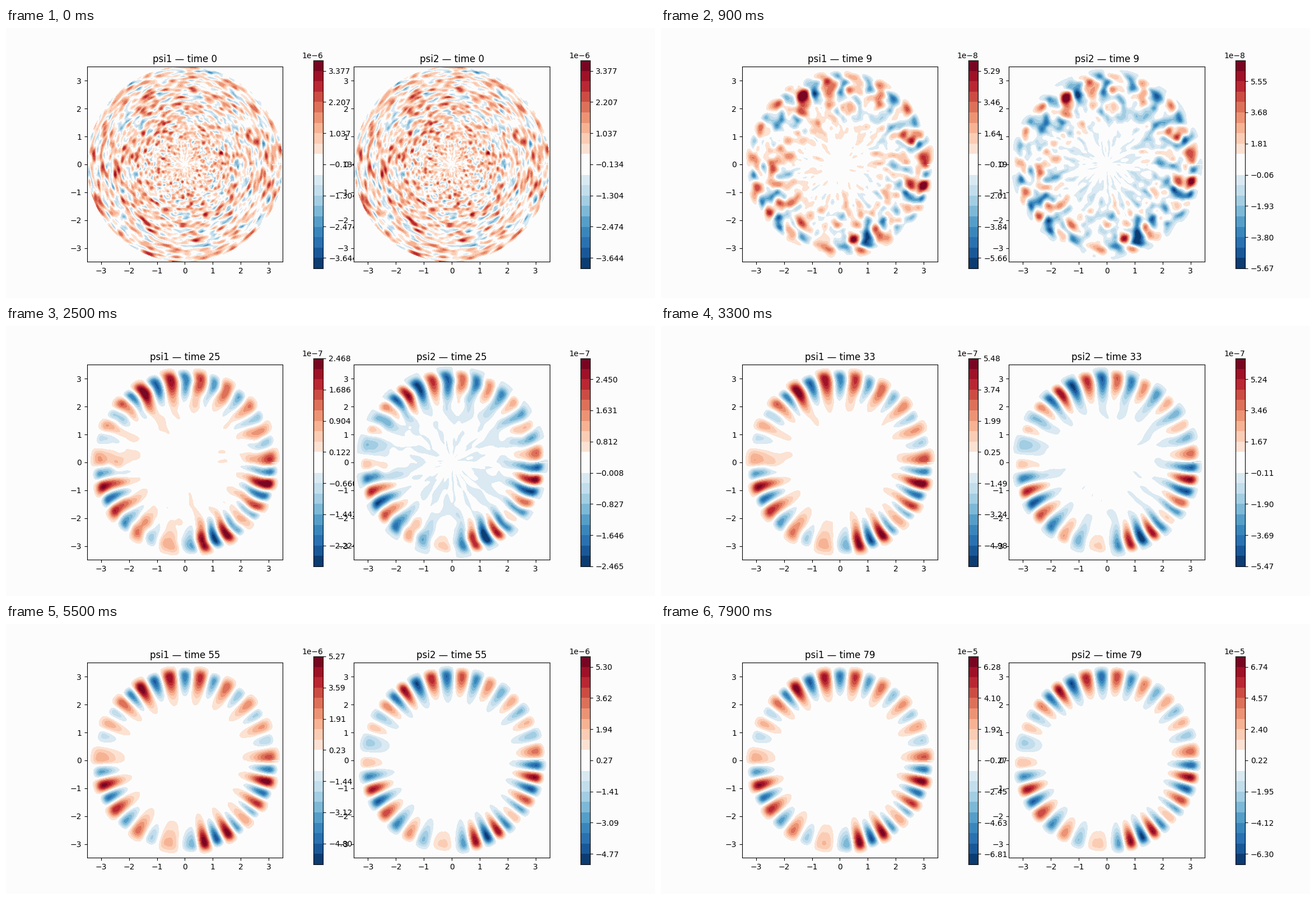
A matplotlib script for the animation above (8000 ms loop, 1159x483 px).

```python
import numpy as np
import matplotlib.pyplot as plt
from matplotlib.animation import FuncAnimation
from matplotlib.ticker import FixedLocator

W, H, DPI = 1159, 483, 100
FRAMES, INTERVAL = 80, 100
PAPER = "#fcfcfc"
BANDS = 20
LOBES = 38
TAU = 2 * np.pi

# Key lobes of the ring wave: number, angle in degrees, strength.
# Even lobes are crests, odd ones troughs; the rest follow in between.
RING = np.array([
    (0, 2.5, .59), (1, 14.5, .34), (5, 50.6, .45), (8, 79.4, .71),
    (12, 121.4, .97), (15, 146, .32), (17, 162.8, .30), (18, 178, .31),
    (20, 197, .90), (22, 215.5, .73), (26, 257.8, .26), (27, 274.4, .52),
    (28, 283.3, .97), (30, 300.7, .95), (32, 315.7, .31), (34, 328.9, .70),
    (36, 345.6, .97)])

# Colour scale while the wave grows: time, then half range and
# centre (as a share of the half range) for each panel.
GROWTH = np.array([
    (9, 6.083e-8, -.0307, 6.2333e-8, .0904),
    (25, 2.60667e-7, -.0532, 2.73056e-7, .09722),
    (41, 1.29556e-6, -.06048, 1.2972e-6, .06437),
    (55, 5.594e-6, -.05828, 5.594e-6, .04755),
    (66, 1.7983e-5, -.05021, 1.7926e-5, .03962),
    (79, 7.273e-5, -.03657, 7.245e-5, .03078)])
START = 3.9007e-6, -.03425

NR, NT = 110, 400
r = np.linspace(.02, 3.5, NR)[:, None]
theta = np.linspace(0, TAU - .007, NT)[None, :]
X, Y = r * np.cos(theta), r * np.sin(theta)

rng = np.random.default_rng(4)
SPECTRUM = np.fft.fft2(rng.standard_normal((NR, NT)))
KR = TAU * np.fft.fftfreq(NR, 3.5 / NR)[:, None]
KT = np.fft.fftfreq(NT, 1 / NT)[None, :]

cmap = plt.get_cmap("RdBu_r")
COLORS = [cmap((i + .5) / BANDS) for i in range(BANDS)]
COLORS[9] = COLORS[10] = PAPER


def rim(start):
    """Fall smoothly from one to zero between start and the outer wall."""
    x = np.clip((r - start) / (3.47 - start), 0, 1)
    return np.cos(np.pi * x / 2) ** 2


def noise(t, turn):
    """Random field that gets smoother and leaves the centre with time."""
    sr = .032 + .06 * (1 - np.exp(-t / 4)) + .002 * t
    st = .036 + .0007 * t
    spec = SPECTRUM * np.exp(-((KR * sr) ** 2 + (KT * st) ** 2) / 2)
    rough = np.fft.ifft2(spec * np.exp(-1j * KT * turn)).real
    rough /= rough.std()
    fresh = np.exp(-t / 1.5)
    return (fresh * (rough + .2) * np.tanh(r / .7)
            + (1 - fresh) * rough * (r / 2.6) ** 1.3 * rim(3.0))


def wave(t, lag):
    """Ring of alternating lobes, moved on by a part of their spacing."""
    number, degrees, strength = RING.T
    angle = np.radians(degrees)
    bend = .08 * np.exp(-t / 15) * np.sin(5 * r)
    phase = np.interp(theta + bend,
                      np.r_[angle - TAU, angle, angle + TAU],
                      np.r_[number - LOBES, number, number + LOBES]) - lag
    size = np.interp(phase, number, strength, period=LOBES)

    crest = 3.04
    reach = .385 * (1 + .35 * np.exp(-(t - 25) / 25))
    inner = np.exp(-np.minimum(r - crest, 0) ** 2 / (2 * reach ** 2))
    return size * np.cos(np.pi * phase) * inner * rim(crest)


def field(t, side):
    settle = side * (1 - np.exp(-t / 3))
    wave_part = np.interp(t, [0, 9, 25], [0, .6, 1])
    noise_part = .24 * np.exp(-max(t - 9, 0) / 11)
    return (wave_part * wave(t, .34 * settle)
            + noise_part * noise(t, .055 * settle))


def scale(t, side):
    """Lowest and highest value of the colour scale."""
    times = GROWTH[:, 0]
    half, mid = GROWTH[:, 1 + 2 * side], GROWTH[:, 2 + 2 * side]
    fade = np.exp(-1.8 * t)
    size = np.exp(np.interp(t, times, np.log(half)))
    size += fade * (START[0] - size)
    share = np.interp(t, times, mid)
    share += fade * (START[1] - share)
    return size * (share - 1), size * (share + 1)


class Panel:
    def __init__(self, side):
        self.side = side
        self.ax = fig.add_subplot(grid[2 * side], facecolor=PAPER)
        self.ax.set(xlim=(-3.5, 3.5), ylim=(-3.5, 3.5), aspect="equal")
        self.bar = fig.add_subplot(grid[2 * side + 1])
        self.bar.imshow([[plt.matplotlib.colors.to_rgba(c)] for c in COLORS],
                        extent=(0, 1, 0, 1), transform=self.bar.transAxes,
                        aspect="auto", origin="lower",
                        interpolation="nearest")
        self.bar.set(xlim=(0, 1), xticks=[])
        self.bar.yaxis.tick_right()
        self.bar.yaxis.set_offset_position("right")
        self.contours = None

    def draw(self, t):
        if self.contours is not None:
            self.contours.remove()
        low, high = scale(t, self.side)
        levels = np.linspace(low, high, BANDS + 1)
        half = (high - low) / 2
        edge = half * 1e-4
        z = np.clip(half * field(t, self.side), low + edge, high - edge)
        self.contours = self.ax.contourf(X, Y, z, levels=levels,
                                         colors=COLORS)
        self.ax.set_title(f"psi{self.side + 1} — time {t}")
        self.bar.set_ylim(low, high)
        self.bar.yaxis.set_major_locator(FixedLocator(levels, nbins=10))


plt.rcParams["font.family"] = "DejaVu Sans"
fig = plt.figure(figsize=((W + .01) / DPI, (H + .01) / DPI), dpi=DPI,
                 facecolor=PAPER)
grid = fig.add_gridspec(1, 4, width_ratios=[20, 1, 20, 1], wspace=.3,
                        left=.125, right=.9, bottom=.11, top=.88)
panels = [Panel(0), Panel(1)]


def draw(t):
    for panel in panels:
        panel.draw(t)
    return []


anim = FuncAnimation(fig, draw, frames=FRAMES, interval=INTERVAL,
                     repeat=True, repeat_delay=0)
plt.show()
```
